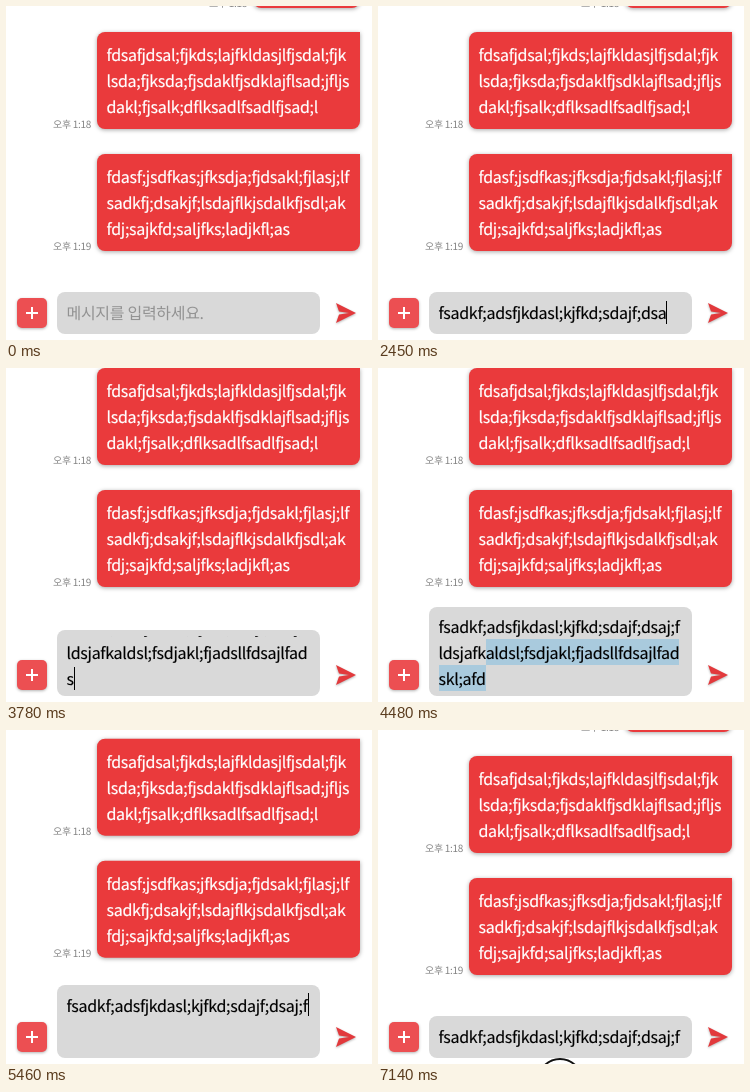
Recreate the animation shown at these times as an HTML page. Size 366 by 334 pixels, loop 7210 ms.

```html
<!DOCTYPE html>
<html lang="en">
<head>
<meta charset="utf-8">
<title>Chat input</title>
<style>
  html, body { margin: 0; width: 100%; height: 100%; overflow: hidden; background: #fff; }
  #stage {
    position: relative; width: 366px; height: 334px; overflow: hidden; background: #fff;
    font: 16px/26px "Noto Sans CJK KR", "Noto Sans CJK JP", "Noto Sans CJK", sans-serif;
    letter-spacing: -.3px; white-space: pre;
    font-variant-ligatures: none; text-rendering: geometricPrecision;
  }
  #stage * { position: absolute; box-sizing: border-box; }
  #list { inset: 0; }
  .bubble {
    left: 91px; width: 263px; height: 97.5px; padding: 9px 9.5px;
    background: #ea3a3c; color: #fff; border-radius: 8px 0 8px 8px;
    box-shadow: 0 1px 4px rgba(0, 0, 0, .35); -webkit-text-stroke: .2px;
  }
  .bubble time {
    right: calc(100% + 6px); bottom: 0; font-size: 10px; line-height: 10px;
    color: #858585; -webkit-text-stroke: 0;
  }
  .strip { left: 0; width: 100%; height: 40px; border-radius: 7px 7px 0 0; }
  #footer { left: 0; width: 100%; bottom: 0; background: #fff; }
  #box { left: 51px; width: 263px; top: 8px; bottom: 6.5px; border-radius: 8px; background: #d9d9d9; }
  #clip { inset: 6px 0 0; overflow: hidden; }
  #text { left: 9.5px; color: #000; -webkit-text-stroke: .15px; }
  #text.empty { color: #929292; -webkit-text-stroke: 0; }
  #stage #text > * { position: static; }
  #text mark { color: inherit; background: #a9cadd; padding: 1.4px 0; }
  #text i {
    display: inline-block; width: 1px; height: 23px; margin: 1.5px -1px 0 0;
    vertical-align: top; background: #000;
  }
  #plus {
    left: 11px; bottom: 12px; width: 30px; height: 30px; border-radius: 5px;
    background: #ec4f52; box-shadow: 0 1px 3px rgba(0, 0, 0, .3);
  }
  #plus::before, #plus::after {
    content: ""; position: absolute; left: 9px; top: 14px; width: 12px; height: 2px; background: #fff;
  }
  #plus::after { transform: rotate(90deg); }
  svg { overflow: visible; width: 20px; height: 20px; }
  #send { left: 329.5px; bottom: 17px; fill: #e2393c; filter: drop-shadow(0 1px 1px rgba(0, 0, 0, .3)); }
  #arrow { left: 0; top: 0; stroke: #fff; stroke-width: 1.4; paint-order: stroke; }
  #ring { left: 0; top: 0; width: 46px; height: 46px; margin: -23px; border: 2px solid #111; border-radius: 50%; }
</style>
</head>
<body>
<div id="stage">
  <div class="strip" id="outer" style="background: #f6f6f6"></div>
  <div class="strip" id="inner" style="background: #efefef"></div>
  <div id="list">
    <div class="bubble" style="left: 247px; width: 107px; top: -96px"><time>오후 1:18</time></div>
    <div class="bubble" style="top: 25.5px"><time>오후 1:18</time>fdsafjdsal;fjkds;lajfkldasjlfjsdal;fjk
lsda;fjksda;fjsdaklfjsdklajflsad;jfljs
dakl;fjsalk;dflksadlfsadlfjsad;l</div>
    <div class="bubble" style="top: 147.5px"><time>오후 1:19</time>fdasf;jsdfkas;jfksdja;fjdsakl;fjlasj;lf
sadkfj;dsakjf;lsdajflkjsdalkfjsdl;ak
fdj;sajkfd;saljfks;ladjkfl;as</div>
  </div>
  <div id="footer">
    <div id="box"><div id="clip"><div id="text"></div></div></div>
    <div id="plus"></div>
    <svg id="send"><path d="M0 0 20 10 0 20 3 11.5 13 10 3 8.5Z"/></svg>
  </div>
  <svg id="arrow"><path d="M0 0V10.5L2.4 8.3 4 12 5.6 11.3 4 7.7 7.4 7.6Z"/></svg>
  <div id="ring"></div>
</div>
<script>
const LOOP = 7210, STEP = 70;
const CLICK = 420, FOCUS = 910, TYPE = 1120, SELECT = 4480, SELECT_MORE = 5040, DELETE = 5460;
const DRAFT = 'fsadkf;adsfjkdasl;kjfkd;sdajf;dsaj;f\nldsjafkaldsl;fsdjakl;fjadsllfdsajlfad\nskl;afd';
const LINE_END = DRAFT.indexOf('\n');

const $ = id => document.getElementById(id);
const within = (t, from, to) => t >= from && t < to;
const ramp = (t, from, to) => Math.min(1, Math.max(0, (t - from) / (to - from)));
const place = (id, x, y) => { $(id).style.transform = `translate(${x}px, ${y}px)`; };
const show = (id, visible) => { $(id).style.visibility = visible ? 'visible' : 'hidden'; };

// Three bursts of typing after the first key, each with a slightly changing pace
function typedCount(t) {
  if (t >= DELETE) return LINE_END;
  if (t < TYPE) return 0;
  return Math.round(1 + 20 * ramp(t, 1190, 1820) ** 1.2
    + 9 * ramp(t, 1890, 2310) + 52 * ramp(t, 2380, 3990) ** .88);
}

function drawInput(t) {
  const text = $('text');
  const draft = DRAFT.slice(0, typedCount(t));
  const multiline = draft.includes('\n');
  const caretShown = within(t, FOCUS, SELECT) || within(t, DELETE, 6020) || within(t, 6440, 7070);

  text.className = t < FOCUS ? 'empty' : '';
  text.style.top = multiline ? 'auto' : '1px';
  text.style.bottom = multiline ? '4.5px' : 'auto';

  if (t < FOCUS) {
    text.textContent = '메시지를 입력하세요.';
  } else if (within(t, SELECT, DELETE)) {
    const start = LINE_END + (t < SELECT_MORE ? 8 : 1);
    text.innerHTML = `${draft.slice(0, start)}<mark>${draft.slice(start)}</mark>`;
  } else {
    text.innerHTML = draft + (caretShown ? '<i></i>' : '');
  }
}

function drawLayout(t) {
  const collapse = ramp(t, DELETE - STEP, 5600);
  const top = 286 - 24 * ramp(t, 2730, 3130) - 23 * ramp(t, 3800, 3920) + 47 * collapse;
  const scroll = ramp(t, 2660, 2730) - 27 * ramp(t, 3150, 3500) + 26 * collapse;
  place('list', 0, scroll);
  place('outer', 0, top - 24);
  place('inner', 0, top - 17);
  $('footer').style.top = `${top - 8}px`;
}

function drawPointer(t) {
  const away = 1 - ramp(t, 210, 280), leave = ramp(t, 6370, 6720);
  place('arrow', 147 + 7 * away - 14 * Math.sin(leave * Math.PI), 312 + 10 * away + 24 * leave);
  show('arrow', within(t, 210, TYPE) || within(t, 6370, 6720));

  const leaving = t >= 7070;
  place('ring', leaving ? 182 : 147.5, leaving ? 351 : 312.5);
  show('ring', leaving || within(t, CLICK, 560) || within(t, 630, FOCUS));
}

function tick() {
  const t = Math.floor(performance.now() % LOOP / STEP) * STEP;
  drawLayout(t);
  drawInput(t);
  drawPointer(t);
  requestAnimationFrame(tick);
}
tick();
</script>
</body>
</html>
```
